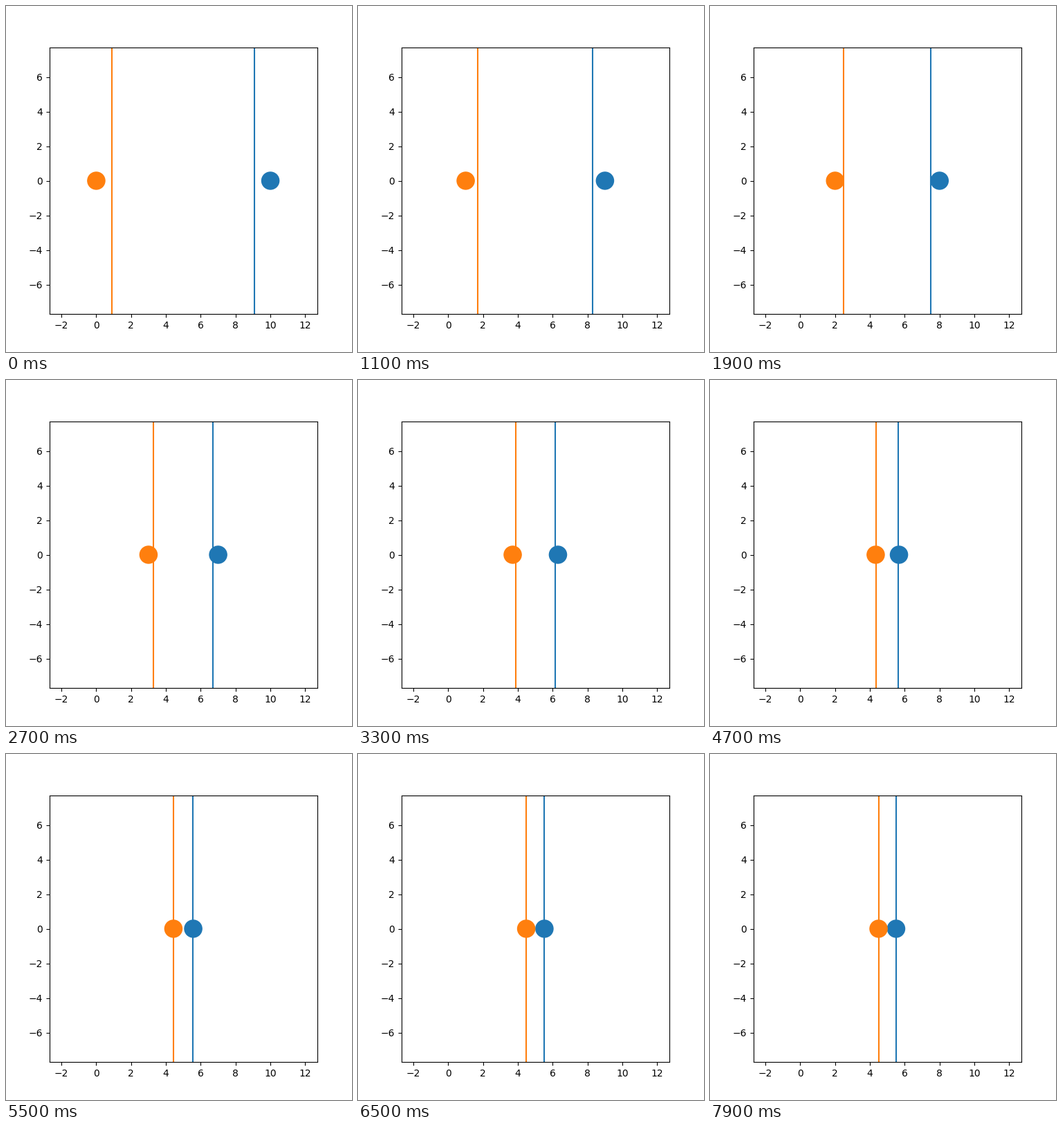
Write a matplotlib script that moves like this. It is 500 px wide and 500 px high and loops after 8 s.

```python
import matplotlib.pyplot as plt
from matplotlib.animation import FuncAnimation
from matplotlib.patches import Circle

TICK = 100          # ms per animation frame
FRAMES = 80
HOLD = 5            # ticks before the first step
STEP = 2            # ticks per simulation step
RADIUS = 0.5
SPAN = 10           # initial distance between the agents
HORIZON = 5         # look-ahead of the avoidance constraint
SPEED = 0.25        # preferred advance per step


def max_advance(x):
    """Half of the remaining gap, spread over the horizon."""
    gap = SPAN - 2 * x - 2 * RADIUS
    return gap / (2 * HORIZON)


def advance(steps):
    x = 0.0
    for _ in range(steps):
        x += min(SPEED, max_advance(x))
    return x


fig, ax = plt.subplots(figsize=(5, 5), dpi=100)
ax.set_xlim(-2.7, 12.7)
ax.set_ylim(-7.7, 7.7)


def add_agent(x, color):
    disc = ax.add_patch(Circle((x, 0), RADIUS, color=color))
    line = ax.axvline(x, color=color)
    return disc, line


right = add_agent(SPAN, "C0")
left = add_agent(0, "C1")


def place(agent, x, bound):
    disc, line = agent
    disc.center = (x, 0)
    line.set_xdata([bound, bound])


def update(i):
    steps = 0 if i < HOLD else 1 + (i - HOLD) // STEP
    x = advance(steps)
    bound = x + max_advance(x)
    place(left, x, bound)
    place(right, SPAN - x, SPAN - bound)
    return (*right, *left)


anim = FuncAnimation(fig, update, frames=FRAMES, interval=TICK,
                     init_func=lambda: update(0), repeat=True, repeat_delay=0)
plt.show()
```
